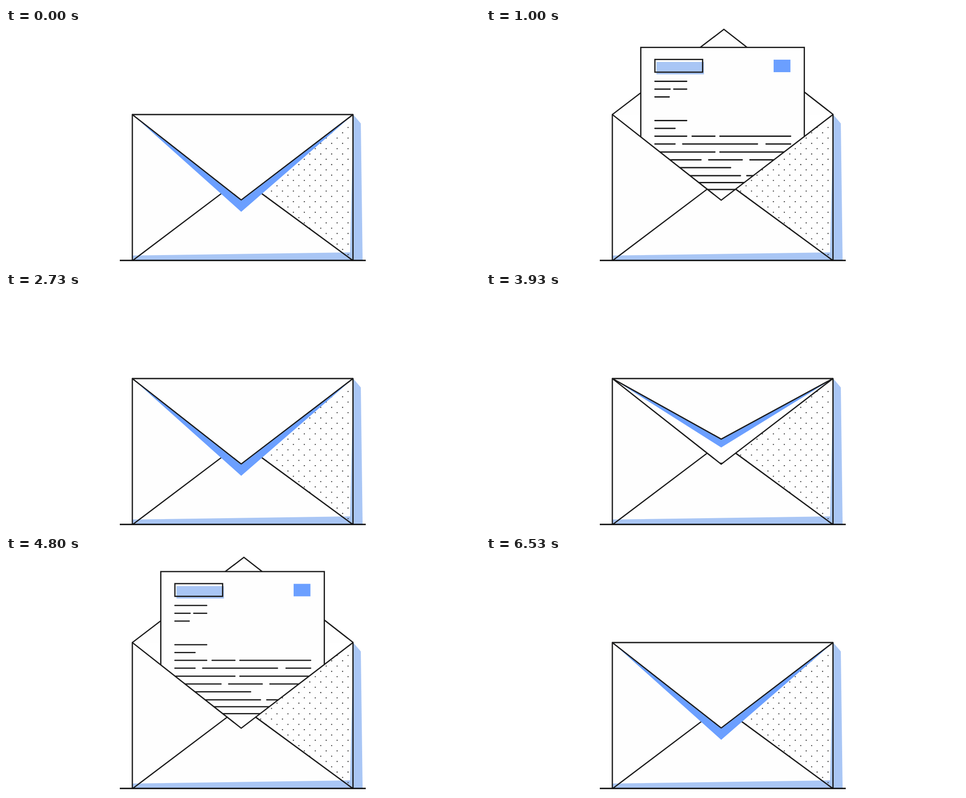
An HTML page for the animation above (7670 ms loop, 1058 by 529 pixels).

```html
<!DOCTYPE html>
<html lang="en">
<head>
<meta charset="utf-8">
<title>Envelope</title>
<style>
  html, body { margin: 0; width: 100%; height: 100%; overflow: hidden; background: #fff; }
  svg { display: block; width: 100%; height: 100%; }
  .ink { stroke: #1c1c1c; stroke-width: 2.8; fill: none; }
  .paper { fill: #fefefe; }
  .pale { fill: #a9c6f5; }
  .blue { fill: #6b9fff; }
</style>
</head>
<body>
<svg viewBox="0 0 1058 529">
  <defs>
    <clipPath id="inside"><rect x="254" y="0" width="549" height="520"/></clipPath>
  </defs>
  <path class="pale" d="M775 194L792 214L796 521H775Z"/>
  <path id="backFlap" class="ink paper"/>
  <g clip-path="url(#inside)">
    <g id="letter">
      <rect class="ink paper" x="345.5" y="0" width="365" height="480"/>
      <rect class="pale" x="380.5" y="32.5" width="106" height="28"/>
      <rect class="ink" x="377" y="27" width="106.5" height="28.5"/>
      <rect class="blue" x="642" y="27.5" width="37.5" height="28"/>
      <path id="writing" class="ink" stroke-linecap="round"/>
    </g>
  </g>
  <path class="paper" d="M282.5 194L525 386L774.5 194V521H282.5Z"/>
  <path class="pale" d="M283 510L768 503L774 250V521H283Z"/>
  <g id="dots" fill="#3a3a3a"></g>
  <path class="ink" d="M283 521L494 361M774 521L557 361"/>
  <path class="ink" stroke-linejoin="round" d="M282 521V194L525 386L774.5 194V521"/>
  <g id="frontFlap">
    <path id="shade" class="blue"/>
    <path id="flap" class="ink paper"/>
  </g>
  <path class="ink" style="stroke:#080808" d="M254 521H803"/>
</svg>
<script>
const LOOP = 7670, FPS = 15;
const HINGE = 194, LETTER_LOW = 384, LETTER_HIGH = 43.5;
const $ = id => document.getElementById(id);
const clamp = v => Math.min(1, Math.max(0, v));

// Rows of writing: offset from the letter's top, then start and end of each dash.
const rows = [
  [76, 377, 448], [93.5, 377, 411, 419, 448], [111, 377, 409],
  [164, 377, 448], [181.5, 377, 422],
  [199, 377, 448, 460, 511, 522, 680],
  [216.5, 377, 422, 439, 606, 625, 680],
  [234.5, 377, 511, 522, 680],
  [252, 377, 480, 497, 572, 589, 680],
  [269.5, 377, 546], [287.5, 377, 568, 582, 680],
  [303, 377, 680], [318.5, 377, 680]
];
$("writing").setAttribute("d", rows.map(([y, ...xs]) =>
  xs.map((x, i) => (i % 2 ? "H" + x : `M${x} ${y}`)).join("")).join(""));

// Staggered dots that fill the right-hand panel.
let dots = "";
for (let i = 0; i < 17; i++) {
  for (let j = i % 2; j < 25; j += 2) {
    const x = 763.5 - 12.2 * i, y = 223 + 11.88 * j;
    const top = HINGE + (775 - x) * 0.768, bottom = 361 + (x - 557) * 0.737;
    if (y > top + 1 && y < bottom + 1) dots += `<circle cx="${x}" cy="${y}" r="1.3"/>`;
  }
}
$("dots").innerHTML = dots;

function bezier(x1, y1, x2, y2) {
  const at = (a, b, t) => 3 * (1 - t) ** 2 * t * a + 3 * (1 - t) * t * t * b + t ** 3;
  return p => {
    if (p <= 0 || p >= 1) return clamp(p);
    let lo = 0, hi = 1;
    for (let i = 0; i < 30; i++) {
      const mid = (lo + hi) / 2;
      if (at(x1, x2, mid) < p) lo = mid; else hi = mid;
    }
    return at(y1, y2, lo);
  };
}
const outBack = bezier(0.45, 1.45, 0.8, 1);

// Each cycle: when the flap opens, the letter falls and the flap shuts.
const cycles = [
  { open: 0, fall: 1980, shut: 2467 },
  { open: 3867, fall: 5847, shut: 6267 }
];
const FLAP_MS = 266, RISE_DELAY = 380, RISE_MS = 620, FALL_MS = 665;

function draw(time) {
  const frame = Math.floor((time % LOOP + 3.4) * FPS / 1000);
  const t = frame * 1000 / FPS;
  const { open, fall, shut } = t < cycles[1].open ? cycles[0] : cycles[1];

  const lift = t < fall
    ? outBack(clamp((t - open - RISE_DELAY) / RISE_MS))
    : outBack(1 - clamp((t - fall) / FALL_MS));
  const letterY = LETTER_LOW + (LETTER_HIGH - LETTER_LOW) * lift;
  $("letter").setAttribute("transform", `translate(0 ${letterY.toFixed(2)})`);

  const swing = clamp((t - open) / FLAP_MS) - clamp((t - shut) / FLAP_MS);
  const fold = Math.cos(Math.PI * swing);
  const isUp = fold < 0;
  $("backFlap").style.display = isUp ? "" : "none";
  $("frontFlap").style.display = isUp ? "none" : "";
  if (isUp) {
    $("backFlap").setAttribute("d", `M282 ${HINGE}L531 ${HINGE + 191 * fold}L775 ${HINGE}`);
  } else {
    $("shade").setAttribute("d", `M282 ${HINGE}L525 ${HINGE + 218 * fold}L775 ${HINGE}Z`);
    $("flap").setAttribute("d", `M282 ${HINGE}L525 ${HINGE + 191.5 * fold}L774.5 ${HINGE}Z`);
    $("flap").setAttribute("stroke-linejoin", "bevel");
  }
}

let start;
function tick(now) {
  start ??= now;
  draw(now - start);
  requestAnimationFrame(tick);
}
draw(0);
requestAnimationFrame(tick);
</script>
</body>
</html>
```
